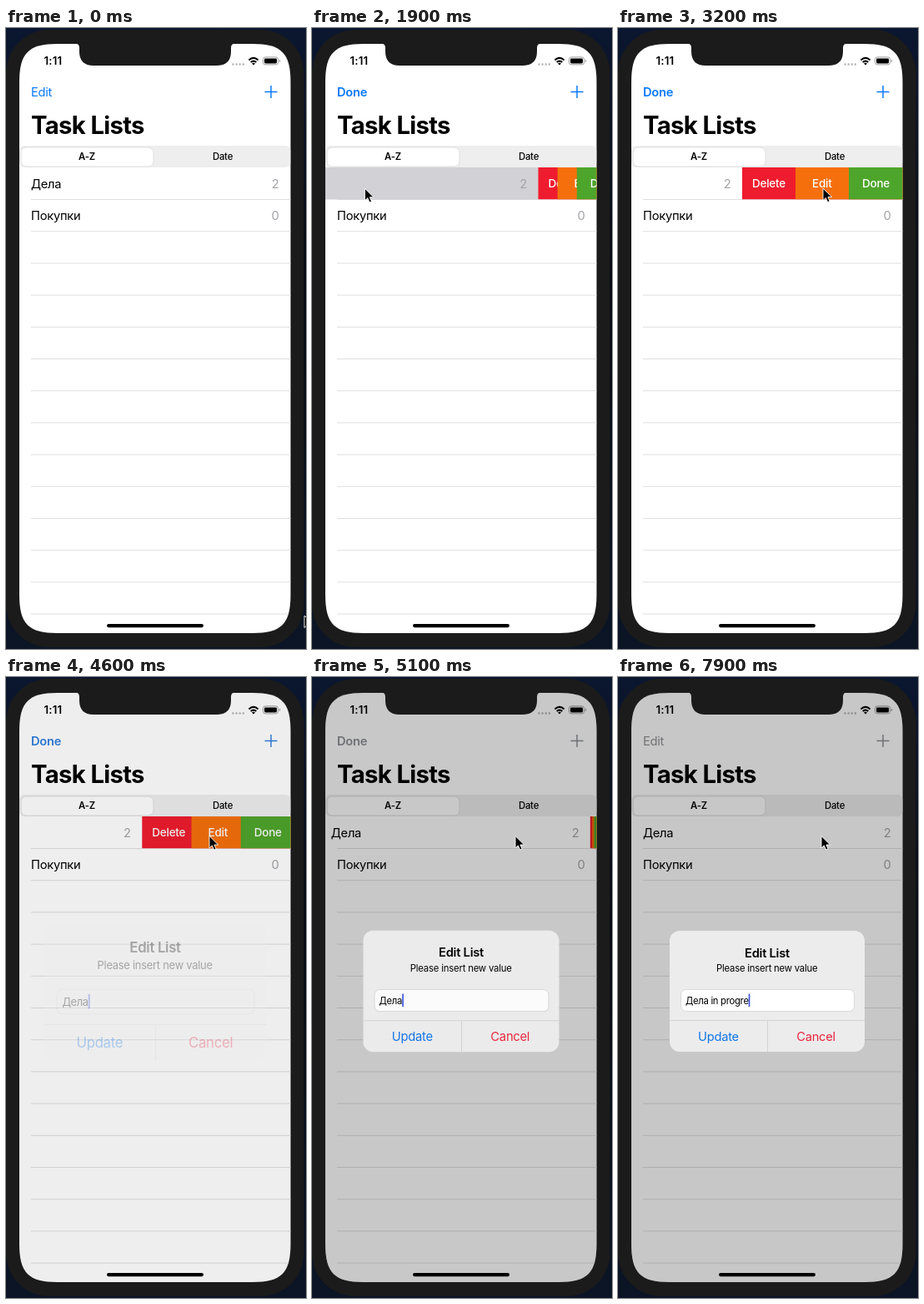
Recreate the animation shown at these times as an HTML page. Size 360 px wide and 744 px high, loop 8000 ms.

```html
<!DOCTYPE html>
<html lang="en">
<head>
<meta charset="utf-8">
<title>Task Lists</title>
<style>
html, body { margin: 0; width: 100%; height: 100%; overflow: hidden; background: #0a111e; }
svg { display: block; width: 360px; height: 744px; }
text { font: 14.7px Inter, "Open Sans", sans-serif; letter-spacing: -.018em; white-space: pre; }
.small { font-size: 11.3px; }
.action { font-size: 13.5px; font-weight: 500; fill: #fff; }
.bold { font-weight: 600; }
.mid { text-anchor: middle; }
.end { text-anchor: end; fill: #a3a3a8; }
</style>
</head>
<body>
<svg viewBox="0 0 360 744">
  <defs>
    <linearGradient id="desk" x2="0" y2="1">
      <stop stop-color="#0b1730"/><stop offset=".4" stop-color="#070a11"/><stop offset="1" stop-color="#0b1526"/>
    </linearGradient>
    <clipPath id="glass">
      <path d="M16 65c0-35 11-46 46-46H295.500c35 0 46 11 46 46V679c0 35-11 46-46 46H62c-35 0-46-11-46-46z"/>
    </clipPath>
  </defs>
  <rect width="360" height="744" fill="url(#desk)"/>
  <rect y="2" width="357.5" height="740" rx="52" fill="#1b1b1b"/>
  <g clip-path="url(#glass)">
    <rect x="16" y="19" width="326" height="706" fill="#fff"/>
    <g id="tint">
      <text id="nav" x="30" y="82"></text>
      <path d="M310.5 76.5h15M318 69v15" stroke="currentColor" stroke-width="1.5"/>
    </g>
    <text x="30" y="127.4" style="font-size:29.3px;font-weight:700;letter-spacing:-.023em">Task Lists</text>
    <rect x="16" y="141" width="325.500" height="26" rx="6" fill="#eeeeef"/>
    <rect x="18" y="143" width="159" height="23" rx="6" fill="#fff" stroke="#dedee0"/>
    <text class="small bold mid" x="97" y="158">A-Z</text>
    <text class="small mid" x="260" y="158" style="font-weight:500">Date</text>
    <path id="lines" stroke="#dfdfe2"/>
    <g id="row">
      <rect id="press" x="16" y="167" width="325" height="38.5" fill="#d1d1d6"/>
      <text x="30" y="192">Дела</text>
      <text class="end" x="327.5" y="192">2</text>
    </g>
    <g id="actions"></g>
    <text x="30" y="230">Покупки</text>
    <text class="end" x="327.5" y="230">0</text>
    <text class="bold" x="45.5" y="44.3" style="font-size:13.3px;letter-spacing:.01em">1:11</text>
    <path d="M272.5 43.5h14" stroke="#b0b0b3" stroke-width="2.4" stroke-linecap="round" stroke-dasharray="0 4.1"/>
    <g fill="none" stroke="#000" stroke-width="2" transform="translate(0 .4)">
      <path d="M291.4 38q5.6-5 11.2 0M293.7 40.7q3.3-3 6.6 0"/>
      <path d="M295 42.2q2-1.5 4 0l-2 2z" fill="#000" stroke="none"/>
      <rect x="308.5" y="34.5" width="18" height="9" rx="2.7" stroke="#999" stroke-width="1"/>
      <rect x="310" y="36" width="15" height="6" rx="1.4" fill="#000" stroke="none"/>
      <path d="M328.5 37.5v3" stroke="#999" stroke-width="1"/>
    </g>
    <rect id="dim" x="16" y="19" width="326" height="706"/>
    <g id="alert">
      <rect x="62" y="304" width="234" height="145" rx="12" fill="#ececed"/>
      <text class="bold mid" x="179" y="335.5">Edit List</text>
      <text class="small mid" x="178.7" y="353">Please insert new value</text>
      <rect id="box" x="75.5" y="374.5" width="208" height="26" rx="6" fill="#fff" stroke="#d9d9dc"/>
      <text id="field" class="small" x="81" y="391.5" style="letter-spacing:-.026em"></text>
      <rect id="caret" y="379.5" width="1.7" height="15.5" fill="#3f55dc"/>
      <path d="M62 411.5h234M179.5 411.5V449" stroke="#d3d3d6"/>
      <text class="mid" x="120.5" y="436" fill="#1174e6">Update</text>
      <text class="mid" x="237.5" y="436" fill="#e8253c">Cancel</text>
    </g>
    <rect x="121" y="714" width="116" height="4.2" rx="2.1"/>
  </g>
  <path d="M83 18.500q5 0 5 5.500v4q0 17 17 17h148q17 0 17-17v-4q0-5.500 5-5.500z" fill="#1b1b1b"/>
  <path id="cursor" d="M0 0v14.500l3.300-3.100 2.300 5.200 2.500-1-2.200-5.100h4.700z" stroke="#fff" stroke-width=".9"/>
</svg>
<script>
const $ = id => document.getElementById(id);
const set = (id, attrs) => Object.entries(attrs).forEach(([k, v]) => $(id).setAttribute(k, v));
const clamp = v => Math.min(1, Math.max(0, v));
const mix = (a, b, p) => a + (b - a) * p;
const smooth = p => p * p * (3 - 2 * p);
// critically damped spring, 0 to 1
const spring = (t, start, rate) => {
  const s = Math.max(0, t - start) * rate;
  return 1 - (1 + s) * Math.exp(-s);
};

const LOOP = 8000, OPEN = 192, RELEASE = 2050;
const path = [ // time, x, y
  [100, 358, 704], [1150, 160, 195], [1450, 143, 193], [1600, 143, 193],
  [RELEASE, 36, 192], [2300, 38, 192], [3200, 246, 192], [3800, 246, 192], [4100, 244, 190.5]
];
const keys = [5900, 6100, 6300, 6600, 6800, 7000, 7200, 7400, 7600, 7800];
const buttons = [["Delete", "#ee1c2e", 12], ["Edit", "#f5700c", 20], ["Done", "#4ea52b", 16]];

$("actions").innerHTML = buttons.map(([label, color, x]) =>
  `<g><rect y="167" width="200" height="38.2" fill="${color}"/><text class="action" x="${x}" y="191">${label}</text></g>`).join("");
set("lines", { d: Array.from({ length: 14 }, (_, i) => `M30 ${205.5 + i * 38.2}H342`).join("") });

function pointer(t) {
  const i = path.findIndex(p => p[0] > t);
  if (i === 0) return path[0].slice(1);
  if (i < 0) return path.at(-1).slice(1);
  const a = path[i - 1], b = path[i], p = smooth((t - a[0]) / (b[0] - a[0]));
  return [mix(a[1], b[1], p), mix(a[2], b[2], p)];
}

function swipe(t) {
  if (t < 1600) return 0;
  if (t < RELEASE) return Math.max(0, 133 - pointer(t)[0]);
  const opened = mix(97, OPEN, spring(t, RELEASE, .015));
  return t > 5400 ? 0 : opened * (1 - spring(t, 4553, .0093));
}

function draw(t) {
  const off = swipe(t), shown = spring(t, 4480, .0092);
  const editing = t >= 1690 && t < 5400;

  set("cursor", { transform: `translate(${pointer(t)})` });
  set("row", { transform: `translate(${-off})` });
  set("press", { opacity: clamp((t - 1520) / 80) * clamp((2250 - t) / 200) });
  [...$("actions").children].forEach((g, i) =>
    g.setAttribute("transform", `translate(${(off ? 341 : 342) - off + i * off / 3})`));

  const [r, g, b] = [[10, 145], [122, 145], [255, 150]].map(([from, to]) => mix(from, to, shown));
  set("tint", { fill: `rgb(${r},${g},${b})`, color: `rgb(${r},${g},${b})` });
  $("nav").textContent = editing ? "Done" : "Edit";
  $("nav").style.fontWeight = editing ? 600 : 400;

  set("dim", { opacity: .22 * shown });
  const scale = 1.2 - .2 * shown;
  set("alert", {
    opacity: shown,
    transform: `translate(179 376.5) scale(${scale}) translate(-179 -376.5)`
  });
  set("box", { "fill-opacity": shown ** 5 });
  $("field").textContent = "Дела" + " in progre".slice(0, keys.filter(k => k <= t).length);
  set("caret", { x: 81 + $("field").getComputedTextLength() });
}

const start = performance.now();
function tick() {
  draw((performance.now() - start) % LOOP);
  requestAnimationFrame(tick);
}
tick();
</script>
</body>
</html>
```
